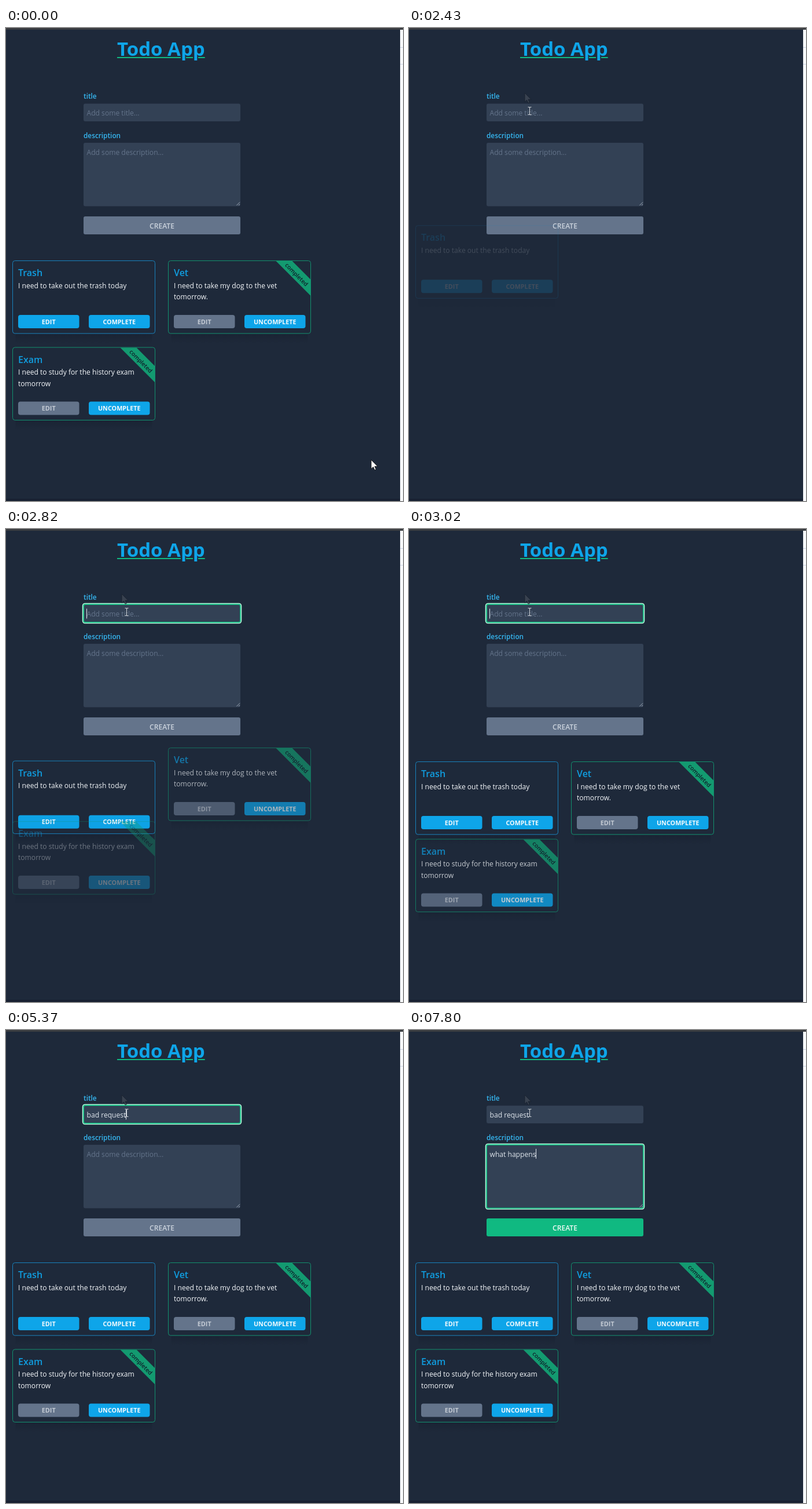
Write an HTML page that moves like this. It is 686 px wide and 816 px high and loops after 8000 ms.

```html
<!DOCTYPE html>
<html lang="en">
<head>
<meta charset="utf-8">
<title>Todo App</title>
<style>
  html, body { margin: 0; width: 100%; height: 100%; overflow: hidden; background: #1e293a; }
  body { position: relative; font-family: "Open Sans", "Noto Sans", sans-serif; }
  h1 {
    position: absolute; left: 192px; top: 15.5px; margin: 0;
    font-size: 33px; line-height: 40px; font-weight: 700; white-space: nowrap; color: #0ea5e9;
    text-decoration: underline 2px #10b981; text-underline-offset: 1.5px;
  }
  svg { position: absolute; left: 0; top: 0; }
  text { font-size: 12.1px; white-space: pre; }
  .label { font-size: 11.8px; font-weight: 600; fill: #36b7f1; }
  .hint { fill: #64748b; }
  .typed { fill: #dfe5ec; }
  .head { font-size: 16px; font-weight: 600; fill: #109ddf; }
  .body { fill: #f4f7fa; }
  .btn { font-size: 10.8px; font-weight: 700; text-anchor: middle; }
  .tag { font-size: 10px; font-weight: 600; text-anchor: middle; fill: #0f1f2a; }
  #create text { font-weight: 600; text-anchor: middle; }
</style>
</head>
<body>
<h1>Todo App</h1>
<svg width="686" height="816" viewBox="0 0 686 816">
  <defs>
    <linearGradient id="shade" x2="0" y2="1">
      <stop offset="0" stop-color="#0b1220" stop-opacity=".22"/>
      <stop offset="1" stop-color="#0b1220" stop-opacity="0"/>
    </linearGradient>
    <path id="pointer" d="M0 0V15.5L3.6 12.2 6 17.6 8.4 16.5 6 11.3H11Z"/>
  </defs>

  <rect y="812" width="681" height="4" fill="#182132"/>
  <rect x="681" width="5" height="816" fill="#f7f9fb"/>
  <path d="M681 33.5h5M681 62.5h5" stroke="#cdd6e6"/>
  <rect width="686" height="3" fill="#3a3d41"/>

  <text class="label" x="134" y="122">title</text>
  <text class="label" x="134" y="190">description</text>
  <g fill="#334155">
    <rect x="134" y="130.5" width="271" height="30.5" rx="3"/>
    <rect x="134" y="198" width="271" height="109.5" rx="3"/>
  </g>
  <path d="M398.5 306L404 300.500M402 306L404 304" stroke="#a3adba"/>
  <g id="ring" fill="none">
    <rect id="inner" x="134" y="130" width="271" rx="3" stroke="#10b981" stroke-width="2"/>
    <rect id="outer" x="132.500" y="128.500" width="274" rx="4" stroke="#b4f5da" stroke-width="1.600"/>
  </g>
  <text id="title" x="139.500" y="151"></text>
  <text id="desc" x="139.500" y="219"></text>
  <rect id="caret" width="1" height="17" fill="#e2e8f0"/>
  <g id="create">
    <rect x="134" y="325" width="271" height="31" rx="3"/>
    <text x="269.500" y="345.500">CREATE</text>
  </g>

  <g id="cards"></g>

  <use id="trace" href="#pointer" x="200" y="112" fill="#424b58" stroke="#18202c" opacity=".75"/>
  <use id="arrow" href="#pointer" fill="#fff" stroke="#111" stroke-width=".9"/>
  <path id="beam" d="M-3 -6.500H-1L0 -5.500 1 -6.500H3M0 -5.500V5.500M-3 6.500H-1L0 5.500 1 6.500H3"
    fill="none" stroke="#c9cdd2" stroke-width="1.100"/>
</svg>
<script>
const LOOP = 8000;
const $ = id => document.getElementById(id);
const clamp = v => Math.max(0, Math.min(1, v));
const mix = (a, b, p) => a + (b - a) * p;
const span = (t, from, to) => clamp((t - from) / (to - from));
const show = (el, on) => el.setAttribute('visibility', on ? 'visible' : 'hidden');
const move = (el, x, y) => el.setAttribute('transform', `translate(${x} ${y})`);

const todos = [
  { x: 11.5, y: 401.5, head: 'Trash', lines: ['I need to take out the trash today'] },
  { x: 280.5, y: 401.5, head: 'Vet', lines: ['I need to take my dog to the vet', 'tomorrow.'], done: true },
  { x: 11.5, y: 551, head: 'Exam', lines: ['I need to study for the history exam', 'tomorrow'], done: true }
];

const button = (x, label, off) => `
  <rect x="${x}" y="93.5" width="105.500" height="23" rx="4" fill="${off ? '#64748b' : '#0ea5e9'}"/>
  <text class="btn" x="${x + 52.75}" y="109.200" fill="${off ? '#c3cad4' : '#f4fafd'}">${label}</text>`;

const ribbon = `
  <path d="M186 .5H214L246 32.500V60.500Z" fill="#139a70"/>
  <text class="tag" transform="translate(221.500 24) rotate(45)" y="3.500">completed</text>`;

$('cards').innerHTML = todos.map(c => `<g>
  <rect x="5" y="126.500" width="236" height="16" fill="url(#shade)"/>
  ${c.done ? ribbon : ''}
  <rect width="246" height="125.500" rx="4" fill="none" stroke="${c.done ? '#12906e' : '#1881bb'}"/>
  <text class="head" x="9.500" y="26.500">${c.head}</text>
  ${c.lines.map((s, i) => `<text class="body" x="9.500" y="${47 + i * 19.7}">${s}</text>`).join('')}
  ${button(9.5, 'EDIT', c.done)}${button(131.5, c.done ? 'UNCOMPLETE' : 'COMPLETE')}
</g>`).join('');
const cards = [...$('cards').children];

// Key press times, one per character
const fields = [
  { el: $('title'), hint: 'Add some title...', text: 'bad request',
    keys: [3690, 3890, 4010, 4310, 4470, 4640, 4980, 5080, 5180, 5270, 5370] },
  { el: $('desc'), hint: 'Add some description...', text: 'what happens',
    keys: [6390, 6490, 6590, 6690, 6860, 6990, 7140, 7340, 7460, 7570, 7690, 7800] }
];
const RELOAD = 1560;

function drawForm(t) {
  for (const f of fields) {
    const n = f.keys.filter(k => k <= t).length;
    const s = n ? f.text.slice(0, n) : f.hint;
    if (f.el.textContent !== s) f.el.textContent = s;
    f.el.setAttribute('class', n ? 'typed' : 'hint');
    f.end = n ? f.el.getComputedTextLength() : 0;
  }
  const inDesc = t >= 5600;
  const focus = (t >= 890 && t < RELOAD) || t >= 2600;
  const blink = t >= 6110 && t < 6390;
  show($('ring'), focus);
  move($('ring'), 0, inDesc ? 68 : 0);
  $('inner').setAttribute('height', inDesc ? 109.5 : 31);
  $('outer').setAttribute('height', inDesc ? 112.5 : 34);
  show($('caret'), focus && !blink);
  move($('caret'), Math.round(139.3 + fields[+inDesc].end), inDesc ? 205 : 137.5);

  const ready = t >= fields[1].keys[0];
  const [box, label] = $('create').children;
  box.setAttribute('fill', ready ? '#10b981' : '#64748b');
  label.setAttribute('fill', ready ? '#effaf5' : '#cbd3dd');
}

// After the reload the cards drop in one after another
function drawCards(t) {
  cards.forEach((g, i) => {
    const start = 2350 + i * 148;
    const p = t < RELOAD ? 1 : span(t, start, start + 480);
    move(g, todos[i].x, todos[i].y - 73 * (1 - p));
    g.setAttribute('opacity', p);
  });
}

function drawPointer(t) {
  const leaving = t < 480, arrow = leaving || (t >= 1350 && t < 2110);
  show($('arrow'), arrow);
  show($('beam'), t >= 2110);
  show($('trace'), t >= 2110);
  if (leaving) {
    const p = span(t, 15, 480), q = 1 - p;
    const curve = (a, b, c) => q * q * a + 2 * q * p * b + p * p * c;
    move($('arrow'), curve(631, 492, 199), curve(745, 369, -20));
  } else if (arrow) {
    const p = span(t, 1350, 2110);
    move($('arrow'), mix(190, 200, p), mix(19, 112, p));
  } else {
    const p = span(t, 2110, 2350);
    move($('beam'), mix(203, 208.5, p), mix(131, 143, p));
  }
}

function frame() {
  const t = performance.now() % LOOP;
  drawForm(t);
  drawCards(t);
  drawPointer(t);
  requestAnimationFrame(frame);
}
frame();
</script>
</body>
</html>
```
